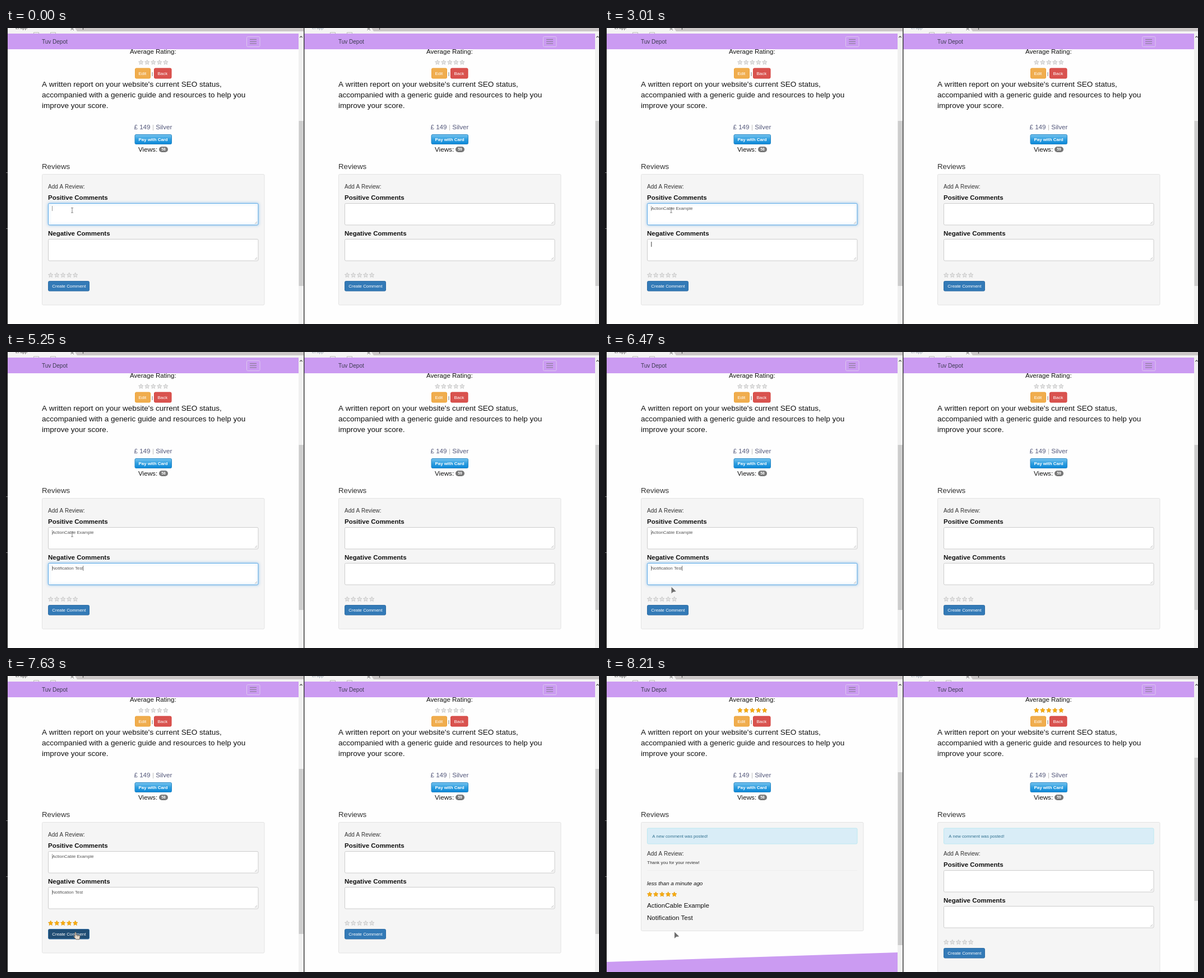
Write an HTML page with a canvas that moves like this. It is 1058x529 px and loops after 9.21 s.

```html
<!DOCTYPE html>
<html lang="en">
<head>
<meta charset="utf-8">
<title>Live review notification</title>
<style>
  html, body { margin: 0; width: 100%; height: 100%; overflow: hidden; background: #fff; }
  canvas { display: block; }
</style>
</head>
<body>
<canvas id="stage" width="1058" height="529"></canvas>
<script>
const ctx = document.getElementById('stage').getContext('2d');
const LOOP = 9210, FOCUS_NEXT = 3010, RATED = 7040, SUBMIT = 8170, POSTED = 8210;
const PURPLE = '#cb9bf2', BLACK = '#111';

// Evenly spaced key times, both ends included.
const ramp = (from, to, n) =>
  Array.from({ length: n }, (_, i) => from + (to - from) * i / (n - 1));

const positive = {
  text: 'ActionCable Example',
  keys: [700, 860, 1030, 1110, 1110, 1190, 1450, ...ramp(1630, 1920, 5),
         2290, ...ramp(2480, 2570, 3), 2750, 2810, 2810]
};
const negative = {
  text: 'Notification Test',
  keys: [...ramp(3660, 4480, 11), 4630, 4690, 4850, 4950, 5180, 5250]
};
const typed = (field, t) => field.text.slice(0, field.keys.filter(k => k <= t).length);

// Pointer path: time, x, y
const path = [
  [6090, 118, 326], [6450, 118.5, 416], [6470, 118.5, 420], [6750, 125, 434],
  [6970, 129, 444], [7040, 125, 442], [7230, 124, 442], [7480, 124, 458], [7790, 124, 457.5]
];

const clamp = v => Math.max(0, Math.min(1, v));

function pointerAt(t) {
  const i = path.findIndex(p => p[0] > t);
  if (i === 0) return path[0].slice(1);
  if (i < 0) return path[path.length - 1].slice(1);
  const [t0, x0, y0] = path[i - 1], [t1, x1, y1] = path[i];
  const k = (t - t0) / (t1 - t0);
  return [x0 + (x1 - x0) * k, y0 + (y1 - y0) * k];
}

function text(str, x, y, size, color = BLACK, style = '') {
  ctx.font = `${style} ${size}px "Liberation Sans", Arial, sans-serif`;
  ctx.fillStyle = color;
  ctx.fillText(str, x, y);
}

function box(x, y, w, h, fill, stroke, r = 2) {
  ctx.beginPath();
  ctx.roundRect(x, y, w, h, r);
  ctx.fillStyle = fill;
  ctx.fill();
  if (stroke) {
    ctx.strokeStyle = stroke;
    ctx.lineWidth = 1;
    ctx.stroke();
  }
}

function line(color, width, ...points) {
  ctx.beginPath();
  for (let i = 0; i < points.length; i += 2) ctx.lineTo(points[i], points[i + 1]);
  ctx.strokeStyle = color;
  ctx.lineWidth = width;
  ctx.stroke();
}

function shape(fill, ...points) {
  ctx.beginPath();
  for (let i = 0; i < points.length; i += 2) ctx.lineTo(points[i], points[i + 1]);
  ctx.closePath();
  ctx.fillStyle = fill;
  ctx.fill();
}

function stars(x, y, gold) {
  for (let n = 0; n < 5; n++) {
    ctx.beginPath();
    for (let i = 0; i < 10; i++) {
      const r = i % 2 ? 2.1 : 4.5, a = i * Math.PI / 5 - Math.PI / 2;
      ctx.lineTo(x + n * 11 + r * Math.cos(a), y + r * Math.sin(a));
    }
    ctx.closePath();
    ctx.fillStyle = gold ? '#f9ac0c' : '#e4e4e4';
    ctx.strokeStyle = gold ? '#e39a10' : '#c2c2c2';
    ctx.lineWidth = 0.8;
    ctx.fill();
    ctx.stroke();
  }
}

function textarea(y, focus, content, caret, mark) {
  box(75.5, y + .5, 374.5, 38.5, '#fff', '#ccc');
  if (focus > 0) {
    ctx.save();
    ctx.globalAlpha = focus;
    ctx.shadowColor = 'rgba(102,175,233,.7)';
    ctx.shadowBlur = 5;
    box(75.5, y + .5, 374.5, 38.5, '#fff', '#66afe9');
    ctx.restore();
  }
  line('#aaa', .8, 444, y + 37, 448, y + 33);
  line('#aaa', .8, 446.5, y + 37, 448, y + 35.5);
  text(content, 82.5, y + 12, 7.75, '#555');
  const end = 82.5 + ctx.measureText(content).width;
  if (mark) line('#999', 1, 82.5, y + 5, 82.5, y + 14);
  if (caret) line('#555', .8, end + .5, y + 5, end + .5, y + 14);
}

function form(shift, s) {
  ctx.save();
  ctx.translate(0, shift);
  text('Add A Review:', 75, 286.5, 10, '#333');
  text('Positive Comments', 75, 306.5, 11.5, BLACK, 'bold');
  textarea(313, s.focus1, s.text1, s.caret1, s.mark1);
  text('Negative Comments', 75, 370.5, 11.5, BLACK, 'bold');
  textarea(377, s.focus2, s.text2, s.caret2, s.mark2);
  stars(79.7, 441.8, s.gold);
  ctx.globalAlpha = s.disabled ? .65 : 1;
  box(75.5, 452.5, 73, 17.5, s.button, '#2e6da4');
  text('Create Comment', 82.3, 464, 7.9, '#fff');
  ctx.restore();
}

function notice() {
  box(75.5, 272, 374.5, 28, '#d9edf7', '#bce8f1');
  text('A new comment was posted!', 84.3, 289, 7.75, '#31708f');
}

function thanks() {
  text('Add A Review:', 75, 321, 10, '#333');
  text('Thank you for your review!', 75.3, 336, 7.93, '#333');
  line('#eee', 1, 75, 347.5, 450, 347.5);
  text('less than a minute ago', 75, 374, 9.9, BLACK, 'italic');
  stars(79.7, 390.3, true);
  text(positive.text, 75, 413.5, 11.6);
  text(negative.text, 75, 435.5, 11.6);
}

function browserTop(tabColor) {
  box(3, 0, 528, 10, '#f4f3f3', null, 0);
  shape('#cbc7c7', 123, 0, 531, 0, 531, 6, 127, 6);
  text('Lt app', 17, 2.2, 7.5, tabColor);
  line('#666', 1, 115.5, 0, 118, 1.5, 121, 4);
  line('#666', 1, 120.5, 0, 118, 1.5, 115.5, 4);
  line('#555', 1.2, 137.5, 0, 137.5, 3);
  for (const x of [49.5, 79.5]) line('#aaa', .8, x, 10, x, 8, x + 9, 8, x + 9, 10);
}

function panel(offset, views, thumb, s) {
  ctx.save();
  ctx.translate(offset, 0);
  box(3, 0, 528, 529, '#fefefe', null, 0);

  text('Average Rating:', 221, 45.8, 11.55);
  stars(240.8, 61.5, s.posted);
  box(230.5, 72, 27, 18, '#f0ad4e', '#eea236');
  text('Edit', 236.5, 84, 8, '#fff');
  text('|', 260, 84, 8, '#333');
  box(264.5, 72, 30.5, 18, '#d9534f', '#d43f3a');
  text('Back', 270.5, 84, 8, '#fff');
  text("A written report on your website's current SEO status,", 64, 104.8, 13.5);
  text('accompanied with a generic guide and resources to help you', 64, 124, 13.5);
  text('improve your score.', 64, 143.3, 13.5);

  text('£ 149', 228.5, 181, 11.6, '#53577a');
  text('|', 261, 181, 11.6, '#bbb');
  text('Silver', 267.3, 181, 11.6, '#53577a');
  const blue = ctx.createLinearGradient(0, 190, 0, 208);
  blue.addColorStop(0, '#7cc6f0');
  blue.addColorStop(.5, '#2f9fe0');
  blue.addColorStop(1, '#0a86d8');
  box(230, 190.5, 65.5, 17, blue, '#2787c4');
  text('Pay with Card', 236.5, 201.7, 7.9, '#fff', 'bold');
  text('Views:', 236, 220.8, 11.7);
  box(273, 212, 16, 10, '#777', null, 5);
  text(views, 277.2, 219.4, 6.8, '#fff', 'bold');

  text('Reviews', 64, 252.3, 13.3, '#333');
  box(64.5, 261.5, 396.5, s.wellHeight, '#f5f5f5', '#e3e3e3');
  if (s.posted) notice();
  if (s.done) {
    thanks();
    shape(PURPLE, 3, 511, 522, 494, 522, 529, 3, 529);
  } else {
    form(s.posted ? 34 : 0, s);
  }

  box(3, 10, 519, 28, PURPLE, null, 0);
  text('Tuv Depot', 64, 28, 10, '#3c3c50');
  box(429.5, 15.5, 23.5, 18, PURPLE, '#dcc8ee');
  for (const y of [20.5, 24.2, 27.9]) line('#8a7d96', 1.2, 435, y, 447, y);

  box(522, 10, 9, 519, '#f0f0f0', null, 0);
  line('#505050', 1.1, 524.3, 17, 526.5, 14.8, 528.7, 17);
  box(522.5, thumb[0], 8.5, thumb[1] - thumb[0], '#cdcdcd', null, 0);
  browserTop(offset ? '#8b97a5' : '#444');
  ctx.restore();
}

function pointer(t) {
  const [x, y] = pointerAt(t);
  ctx.save();
  ctx.translate(x, y);
  if (t < 6470) {
    line('#777', .9, 0, -4.5, 0, 4);
    line('#777', .9, -2, -4.5, 2, -4.5);
    line('#777', .9, -2, 4, 2, 4);
  } else if (t >= RATED && t < SUBMIT) {
    const hand = new Path2D('M-1 1Q0-1 1 1V5L7 6Q8 6 8 8L7 13H1L-3 8Q-3 6-1 8Z');
    ctx.fillStyle = '#e9ddcf';
    ctx.fill(hand);
    ctx.strokeStyle = '#76695d';
    ctx.lineWidth = 1;
    ctx.stroke(hand);
    for (const fx of [3, 5]) line('#76695d', .7, fx, 5.5, fx, 8);
  } else {
    shape('#6e6e6e', 0, 0, 0, 11.5, 3, 8.6, 8.3, 8);
  }
  ctx.restore();
}

function buttonColor(t) {
  if (t >= SUBMIT) return '#337ab7';
  if (t >= 7630) return '#204d74';
  return t >= 7370 ? '#286090' : '#337ab7';
}

function draw(t) {
  const posted = t >= POSTED;
  const idle = {
    posted, wellHeight: posted ? 268 : 233.5, button: '#337ab7',
    focus1: 0, focus2: 0, text1: '', text2: ''
  };
  const moved = t >= FOCUS_NEXT;
  const active = {
    ...idle,
    done: posted,
    wellHeight: posted ? 194 : 233.5,
    focus1: 1 - clamp((t - FOCUS_NEXT - 30) / 80),
    focus2: clamp((t - FOCUS_NEXT - 30) / 80) * (1 - clamp((t - RATED) / 100)),
    text1: typed(positive, t),
    text2: typed(negative, t),
    caret1: !moved && t >= 700,
    caret2: moved && t < RATED,
    mark1: true,
    mark2: moved,
    gold: t >= RATED,
    button: buttonColor(t),
    disabled: t >= SUBMIT
  };
  ctx.clearRect(0, 0, 1058, 529);
  panel(529, '59', posted ? [146, 402] : [166, 461], idle);
  panel(0, '58', posted ? [172, 481] : [166, 461], active);
  box(0, 0, 3, 529, '#1b1b1d', null, 0);
  for (const y of [258.5, 358.5]) line('#77777a', 1, 0, y, 3, y);
  box(531, 0, 1.5, 529, '#3c3c3c', null, 0);
  pointer(t);
}

const start = performance.now();
function tick() {
  draw((performance.now() - start) % LOOP);
  requestAnimationFrame(tick);
}
tick();
</script>
</body>
</html>
```
